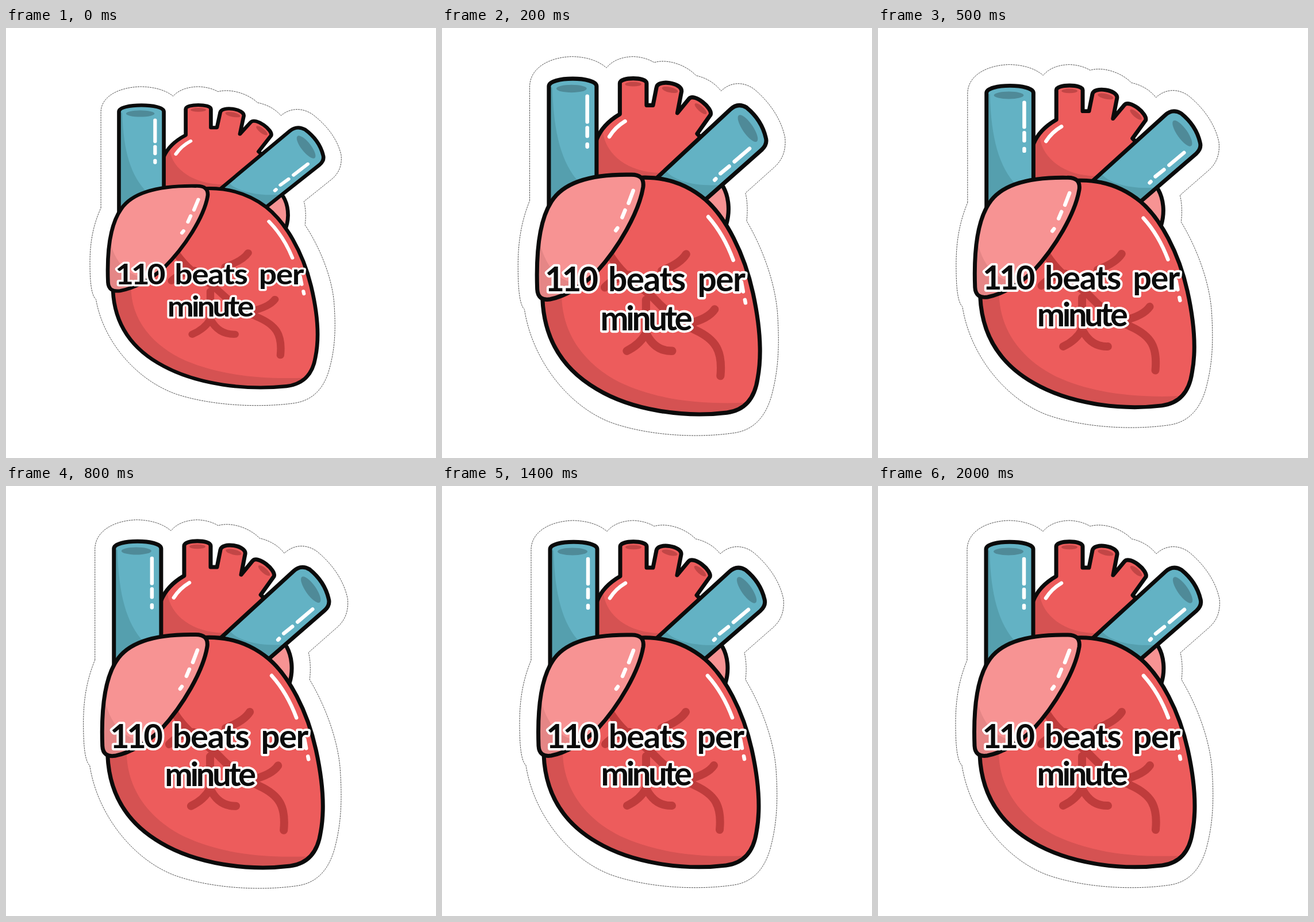
Write an HTML page that moves like this. It is 748 px wide and 748 px high and loops after 2.1 s.

```html
<!DOCTYPE html>
<html lang="en">
<head>
<meta charset="utf-8">
<title>Heartbeat</title>
<style>
html, body { margin: 0; width: 100%; height: 100%; overflow: hidden; background: #fff; }
svg { display: block; width: 100vw; height: 100vh; }
.heart { transform-origin: 365px 379.5px; animation: beat 2.1s step-end infinite; }

/* Damped spring, half period 300 ms, sampled every 100 ms */
@keyframes beat {
  0%      { transform: scale(.952, .8685); }
  4.762%  { transform: scale(.9834, .9539); }
  9.524%  { transform: scale(1.0118, 1.0323); }
  14.286% { transform: scale(1.0163, 1.0454); }
  19.048% { transform: scale(1.0057, 1.0159); }
  23.81%  { transform: scale(.996, .9888); }
  28.571% { transform: scale(.9944, .9843); }
  33.333% { transform: scale(.998, .9945); }
  38.095% { transform: scale(1.0014, 1.0038); }
  42.857% { transform: scale(1.0019, 1.0054); }
  47.619% { transform: scale(1.0007, 1.0019); }
  52.381% { transform: scale(.9995, .9987); }
  57.143% { transform: scale(.9993, .9981); }
  61.905% { transform: scale(.9997, .9993); }
  66.667%, 100% { transform: none; }
}

.ink { stroke: #0b0b0b; stroke-width: 7; stroke-linejoin: round; stroke-linecap: round; }
.line { fill: none; }
.red { fill: #ed5c5c; }
.red-shade { fill: #d55252; }
.red-hole { fill: #c24646; }
.blue { fill: #63b2c4; }
.blue-shade { fill: #559fae; }
.blue-hole { fill: #4f8a98; }
.pink { fill: #f79393; }
.pink-shade { fill: #e58686; }
.shine, .vein { fill: none; stroke-linecap: round; stroke-linejoin: round; }
.shine { stroke: #fff; stroke-width: 6.5; }
.vein { stroke: #bf3c3c; stroke-width: 14; }
.edge { fill: #fff; stroke: #222; stroke-width: .8; stroke-dasharray: 3 1.2; vector-effect: non-scaling-stroke; }
text {
  font: 700 58px Lato, "Open Sans", sans-serif; letter-spacing: -1.5px; text-anchor: middle;
  fill: #0b0b0b; stroke: #fff; stroke-width: 8; stroke-linejoin: round; paint-order: stroke;
}
.tight { letter-spacing: -4.5px; }
</style>
</head>
<body>
<svg viewBox="0 0 748 748">
  <defs>
    <path id="body" d="M345 264C392 262 428 277 457 301C492 331 524 391 539 459C550 509 555 560 547 602C542 636 525 656 494 660C420 669 331 656 270 620C216 589 180 540 177 468C180 380 240 300 345 264Z"/>
    <path id="atrium" d="M328 259Q353 258 350 280C343 322 308 382 270 423C245 447 216 464 190 469Q169 472 168 452C166 398 170 339 192 305C213 271 262 258 328 259Z"/>
    <clipPath id="in-body"><use href="#body"/></clipPath>
    <clipPath id="in-atrium"><use href="#atrium"/></clipPath>
  </defs>

  <g class="heart">
    <path class="edge" d="M155 303V110C156 78 190 61 228 60Q266 61 287 79Q302 61 333 60Q354 61 369 70C393 63 425 75 441 92Q468 98 484 118C501 102 523 102 541 115C569 138 588 167 594 197C596 219 589 235 575 247L526 290Q531 311 528 337C555 382 577 441 581 492C585 552 582 590 571 631C560 669 539 689 508 694C440 704 354 698 293 676C220 648 159 570 146 486C136 477 135 441 135 412C135 371 141 337 155 303Z"/>

    <path class="pink" d="M450 306L488 280C497 296 500 320 493 343Z"/>
    <path class="ink line" d="M488 280C497 296 500 320 493 343"/>

    <!-- aorta -->
    <path class="red" d="M270 270V200C277 182 291 168 310 157V105C310 94 356 94 356 105V142H367L373 112C375 98 418 104 416 119L409 155L429 131C438 121 470 147 466 158L443 190L449 196L380 270Z"/>
    <path class="red-shade" d="M270 188H281C286 225 324 256 380 256L382 272H270Z"/>
    <path class="ink line" d="M270 200C277 182 291 168 310 157V105C310 94 356 94 356 105V142H367L373 112C375 98 418 104 416 119L409 155L429 131C438 121 470 147 466 158L443 190L449 196"/>
    <ellipse class="red-hole" cx="333" cy="106.500" rx="14" ry="3.800"/>
    <ellipse class="red-hole" cx="396" cy="116" rx="14" ry="4.500" transform="rotate(13 396 116)"/>
    <ellipse class="red-hole" cx="449" cy="148" rx="13" ry="4.500" transform="rotate(41 449 148)"/>
    <path class="shine" d="M292 195Q302 179 319 169"/>

    <!-- left vein -->
    <path class="blue" d="M188 315V110C188 93 270 93 270 110V275Z"/>
    <path class="blue-shade" d="M188 112H194C196 190 210 240 240 272L188 315Z"/>
    <path class="ink line" d="M188 315V110C188 93 270 93 270 110V275"/>
    <ellipse class="blue-hole" cx="227" cy="114" rx="26" ry="6.500"/>
    <path class="shine" d="M254 127V170M254 180V194M254 208V212"/>

    <!-- right vein -->
    <path class="blue" d="M372 266L500 149Q513 137 528 146Q554 167 561 197Q564 208 554 217L456 302Z"/>
    <path class="blue-shade" d="M372 266L388 251C402 270 442 280 486 276L456 304Z"/>
    <path class="ink line" d="M372 266L500 149Q513 137 528 146Q554 167 561 197Q564 208 554 217L456 302"/>
    <ellipse class="blue-hole" cx="530" cy="181" rx="27" ry="9" transform="rotate(55 530 181)"/>
    <path class="shine" d="M533 215L507 237M498 245L483 257M475 266L473 268"/>

    <!-- ventricles -->
    <use href="#body" class="red"/>
    <g clip-path="url(#in-body)">
      <path class="red-shade" d="M210 455C208 525 248 578 310 609C378 640 455 648 550 642V680H160V455Z"/>
      <path class="vein" d="M294 396C320 436 350 448 372 471C392 492 412 508 440 521C475 537 487 556 483 598M424 393Q414 409 382 421M284 449Q300 432 326 428M473 486Q462 502 428 510M355 470V526Q345 545 322 556M355 526Q370 557 400 556"/>
    </g>
    <use href="#body" class="ink line"/>
    <path class="shine" d="M462 330Q489 360 505 403M519 440L522 456M525 470L526 475"/>

    <use href="#atrium" class="pink"/>
    <path class="pink-shade" clip-path="url(#in-atrium)" d="M168 350C176 408 199 441 250 446L190 480H160Z"/>
    <use href="#atrium" class="ink line"/>
    <path class="shine" d="M333 286L325 307M319 319L314 331M306 349L303 353"/>

    <text class="tight" x="225" y="456">110</text>
    <text x="356" y="456">beats</text>
    <text x="484" y="456">per</text>
    <text class="tight" x="353.500" y="521">minute</text>
  </g>
</svg>
</body>
</html>
```
